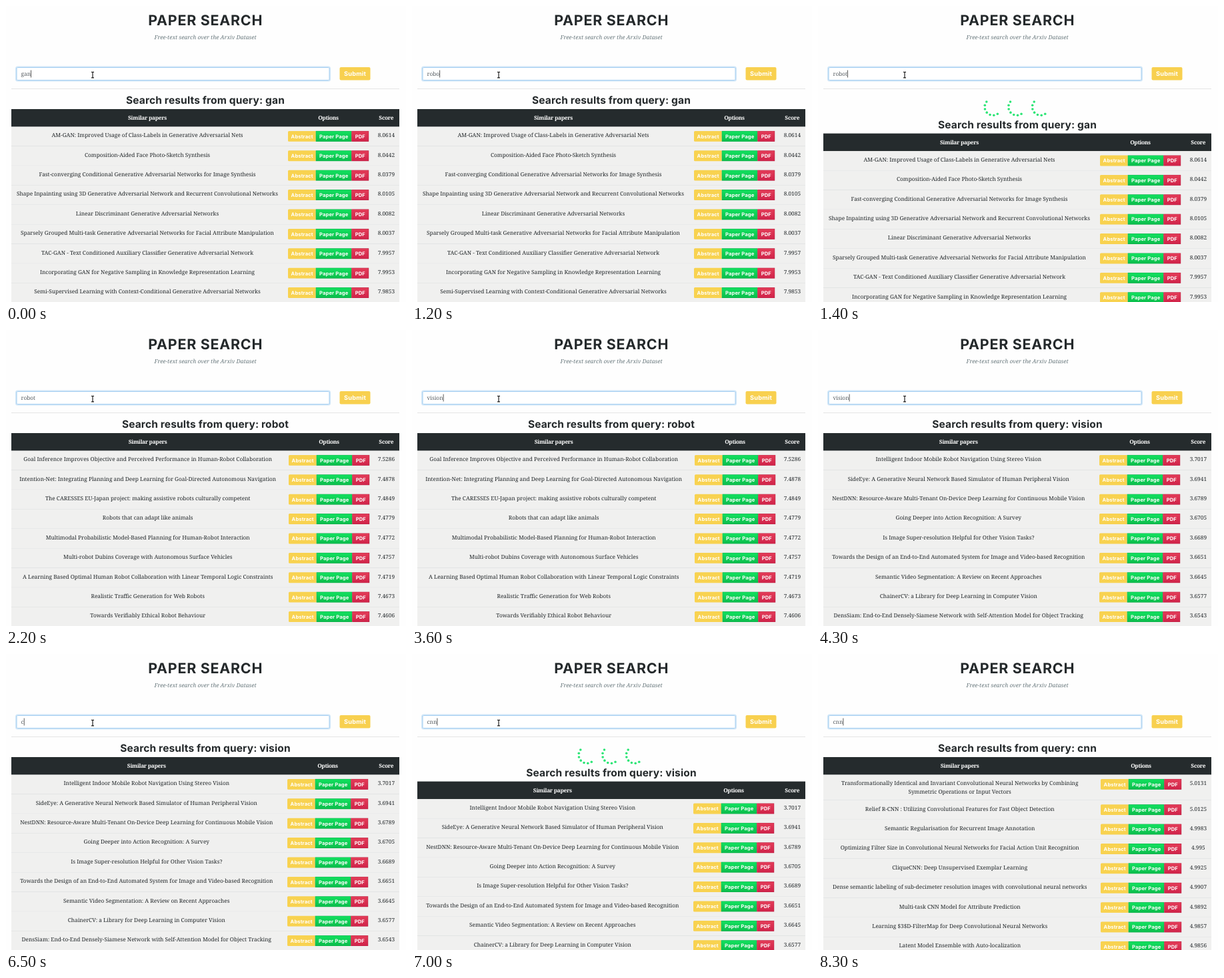
An HTML page for the animation above (9 s loop, 600 by 445 pixels).

```html
<!DOCTYPE html>
<html lang="en">
<head>
<meta charset="utf-8">
<title>Paper Search</title>
<style>
  html, body { margin: 0; width: 100%; height: 100%; overflow: hidden; background: #fefefe; }
  svg { display: block; }
  text { font: 500 8.3px "Noto Serif", serif; fill: #212629; text-rendering: geometricPrecision; white-space: pre; }
  .mid { text-anchor: middle; }
  .title, .heading, .button, .submit { font-family: Inter, sans-serif; font-weight: 700; fill: #24292b; }
  .title { font-size: 21.4px; letter-spacing: .75px; }
  .heading { font-size: 15.5px; letter-spacing: .13px; }
  .subtitle { font-size: 8.45px; font-weight: 400; font-style: italic; fill: #65757a; }
  .button { font-size: 7.6px; letter-spacing: .13px; fill: #fff; }
  .submit { font-size: 9.2px; letter-spacing: .2px; fill: #fff; }
  .column { font-weight: 700; letter-spacing: -.3px; fill: #fff; }
  #query { fill: #555c61; }
</style>
</head>
<body>
<svg width="600" height="445" viewBox="0 0 600 445">
  <defs>
    <linearGradient id="green" x2="0" y2="1"><stop stop-color="#12e05f"/><stop offset="1" stop-color="#0cbd4c"/></linearGradient>
    <linearGradient id="red" x2="0" y2="1"><stop stop-color="#e33c58"/><stop offset="1" stop-color="#d0244a"/></linearGradient>
  </defs>
  <rect width="600" height="445" fill="#fefefe"/>
  <text class="title mid" x="299.2" y="29.3">PAPER SEARCH</text>
  <text class="subtitle mid" x="299" y="50.3">Free-text search over the Arxiv Dataset</text>

  <rect x="15" y="91.5" width="471" height="21" rx="2.5" fill="#fff" stroke="#d2e7f8" stroke-width="2"/>
  <rect x="16" y="92.5" width="469" height="19" rx="1.5" fill="#fff" stroke="#a3cdf0"/>
  <rect id="selection" x="22.5" y="96" height="12" fill="#3297fd"/>
  <text id="query" x="22.5" y="105.3"></text>
  <rect id="caret" y="96.5" width=".8" height="11" fill="#333"/>
  <path id="pointer" d="M-2-4.2H-.6L0-3.7 .6-4.2H2M0-3.7V3.7M-2 4.2H-.6L0 3.7 .6 4.2H2" fill="none" stroke="#222" stroke-width="1.2"/>

  <rect x="500.5" y="92" width="46" height="19.5" rx="2" fill="#f8d04f"/>
  <text class="submit mid" x="523.5" y="104.8">Submit</text>
  <path d="M8 124.5H590" stroke="#e4e4e4"/>
  <g id="loader" fill="#2be575"></g>
  <g id="results"></g>
</svg>
<script>
const LOOP = 9000, ROW = 29.4, LINE = 12.6, BUTTON = 15.9, LOADER_HEIGHT = 36.6;

// shift: offset of the options column; title: centre of the papers column
const searches = {
  gan: { shift: 0, title: 212, papers: [
    ["AM-GAN: Improved Usage of Class-Labels in Generative Adversarial Nets", "8.0614"],
    ["Composition-Aided Face Photo-Sketch Synthesis", "8.0442"],
    ["Fast-converging Conditional Generative Adversarial Networks for Image Synthesis", "8.0379"],
    ["Shape Inpainting using 3D Generative Adversarial Network and Recurrent Convolutional Networks", "8.0105"],
    ["Linear Discriminant Generative Adversarial Networks", "8.0082"],
    ["Sparsely Grouped Multi-task Generative Adversarial Networks for Facial Attribute Manipulation", "8.0037"],
    ["TAC-GAN - Text Conditioned Auxiliary Classifier Generative Adversarial Network", "7.9957"],
    ["Incorporating GAN for Negative Sampling in Knowledge Representation Learning", "7.9953"],
    ["Semi-Supervised Learning with Context-Conditional Generative Adversarial Networks", "7.9853"]] },
  robot: { shift: 1, title: 212.7, papers: [
    ["Goal Inference Improves Objective and Perceived Performance in Human-Robot Collaboration", "7.5286"],
    ["Intention-Net: Integrating Planning and Deep Learning for Goal-Directed Autonomous Navigation", "7.4878"],
    ["The CARESSES EU-Japan project: making assistive robots culturally competent", "7.4849"],
    ["Robots that can adapt like animals", "7.4779"],
    ["Multimodal Probabilistic Model-Based Planning for Human-Robot Interaction", "7.4772"],
    ["Multi-robot Dubins Coverage with Autonomous Surface Vehicles", "7.4757"],
    ["A Learning Based Optimal Human Robot Collaboration with Linear Temporal Logic Constraints", "7.4719"],
    ["Realistic Traffic Generation for Web Robots", "7.4673"],
    ["Towards Verifiably Ethical Robot Behaviour", "7.4606"]] },
  vision: { shift: -1, title: 210.8, papers: [
    ["Intelligent Indoor Mobile Robot Navigation Using Stereo Vision", "3.7017"],
    ["SideEye: A Generative Neural Network Based Simulator of Human Peripheral Vision", "3.6941"],
    ["NestDNN: Resource-Aware Multi-Tenant On-Device Deep Learning for Continuous Mobile Vision", "3.6789"],
    ["Going Deeper into Action Recognition: A Survey", "3.6705"],
    ["Is Image Super-resolution Helpful for Other Vision Tasks?", "3.6689"],
    ["Towards the Design of an End-to-End Automated System for Image and Video-based Recognition", "3.6651"],
    ["Semantic Video Segmentation: A Review on Recent Approaches", "3.6645"],
    ["ChainerCV: a Library for Deep Learning in Computer Vision", "3.6577"],
    ["DensSiam: End-to-End Densely-Siamese Network with Self-Attention Model for Object Tracking", "3.6543"]] },
  cnn: { shift: 1, title: 212.7, papers: [
    ["Transformationally Identical and Invariant Convolutional Neural Networks by Combining|Symmetric Operations or Input Vectors", "5.0131"],
    ["Relief R-CNN : Utilizing Convolutional Features for Fast Object Detection", "5.0125"],
    ["Semantic Regularisation for Recurrent Image Annotation", "4.9983"],
    ["Optimizing Filter Size in Convolutional Neural Networks for Facial Action Unit Recognition", "4.995"],
    ["CliqueCNN: Deep Unsupervised Exemplar Learning", "4.9925"],
    ["Dense semantic labeling of sub-decimeter resolution images with convolutional neural networks", "4.9907"],
    ["Multi-task CNN Model for Attribute Prediction", "4.9892"],
    ["Learning $3$D-FilterMap for Deep Convolutional Neural Networks", "4.9857"],
    ["Latent Model Ensemble with Auto-localization", "4.9856"]] }
};

// Each entry changes part of the state from its time on.
const timeline = [
  [0, { text: "gan", caret: 1, selected: 0, results: "gan", loading: 0, pointer: [130, 103.6] }],
  [200, { selected: .5, caret: 0 }],
  [300, { selected: 1 }],
  [700, { text: "r", selected: 0, caret: 1 }],
  [1100, { text: "rob" }],
  [1200, { text: "robo" }],
  [1400, { text: "robot", loading: 1 }],
  [1500, { loading: 2 }],
  [1600, { results: "robot", loading: 0 }],
  [2200, { caret: 0 }],
  [2400, { selected: .5 }],
  [2500, { selected: 1 }],
  [3100, { text: "v", selected: 0, caret: 1 }],
  [3200, { text: "vi" }],
  [3300, { text: "visi" }],
  [3600, { text: "vision" }],
  [4100, { loading: 1 }],
  [4200, { loading: 2 }],
  [4300, { results: "vision", loading: 0 }],
  [4400, { caret: 0 }],
  [5200, { caret: 1 }],
  [6500, { text: "c" }],
  [6800, { text: "cn" }],
  [6900, { text: "cnn" }],
  [7000, { loading: 1 }],
  [7100, { loading: 2 }],
  [7200, { results: "cnn", loading: 0 }],
  [7600, { caret: 0 }],
  [7800, { pointer: [150, 105.5] }],
  [7900, { pointer: [180, 108] }],
  [8000, { pointer: null }],
  [8300, { caret: 1 }]
];

const $ = id => document.getElementById(id);
const label = (x, y, text, kind = "") => `<text class="mid ${kind}" x="${x}" y="${y}">${text}</text>`;
const box = (x, y, w, h, fill) => `<rect x="${x}" y="${y}" width="${w}" height="${h}" fill="${fill}"/>`;

function buttons(x, y) {
  const bordered = (left, width, border, fill) =>
    box(left, y, width, BUTTON, border) + box(left + .5, y + .5, width - 1, BUTTON - 1, fill);
  return `<path d="M${x + 41.7} ${y}h-40.2q-1.5 0-1.5 1.5v${BUTTON - 3}q0 1.5 1.5 1.5h40.2z" fill="#f8d250"/>` +
    bordered(x + 41.7, 53.6, "#0aa846", "url(#green)") +
    bordered(x + 95.3, 25.9, "#b82243", "url(#red)") +
    label(x + 21.2, y + 10.8, "Abstract", "button") +
    label(x + 68.7, y + 10.8, "Paper Page", "button") +
    label(x + 108.3, y + 10.8, "PDF", "button");
}

function resultsMarkup(name) {
  const { shift, title, papers } = searches[name];
  let svg = label(299, 147.2, "Search results from query: " + name, "heading") +
    box(8, 155, 582, 26.6, "#252b2d") +
    label(title, 171, "Similar papers", "column") +
    label(483.5 + shift, 171, "Options", "column") +
    label(570.3, 171, "Score", "column");
  let y = 181.6;
  for (const [paper, score] of papers) {
    const lines = paper.split("|");
    const height = lines.length > 1 ? 2 * LINE + 13.1 : ROW;
    svg += box(8, y, 582, height, "#f0f0ef") + box(8, y + height - .6, 582, .6, "#d9dcde") +
      lines.map((line, i) => label(title, y + 15.6 + i * LINE, line)).join("") +
      buttons(423 + shift, y + 6.3) + label(570.4, y + 15.6, score);
    y += height;
  }
  return svg;
}

function loaderMarkup(step) {
  let svg = "";
  for (let ring = 0; ring < 3; ring++)
    for (let dot = 0; dot < 7; dot++) {
      const angle = (219 - dot * 27 + (step - 1) * 40) * Math.PI / 180;
      const x = 262.5 + ring * 35.7 + 12.5 * Math.cos(angle);
      const y = 151.8 + 12.5 * Math.sin(angle);
      svg += `<circle cx="${x}" cy="${y}" r="1.8"/>`;
    }
  return svg;
}

let shownResults, shownEntry;
function render(time) {
  const past = timeline.filter(([start]) => start <= time);
  if (past.length === shownEntry) return;
  shownEntry = past.length;
  const state = Object.assign({}, ...past.map(([, change]) => change));

  const query = $("query");
  query.textContent = state.text;
  query.style.fill = state.selected === 1 ? "#fff" : "";
  const width = query.getComputedTextLength();
  $("selection").setAttribute("width", width);
  $("selection").setAttribute("opacity", state.selected);
  $("caret").setAttribute("x", 22.7 + width);
  $("caret").setAttribute("opacity", state.caret);
  $("pointer").setAttribute("opacity", state.pointer ? 1 : 0);
  if (state.pointer) $("pointer").setAttribute("transform", `translate(${state.pointer})`);

  if (state.results !== shownResults) {
    shownResults = state.results;
    $("results").innerHTML = resultsMarkup(shownResults);
  }
  $("loader").innerHTML = state.loading ? loaderMarkup(state.loading) : "";
  $("results").setAttribute("transform", `translate(0 ${state.loading ? LOADER_HEIGHT : 0})`);
}

function tick() {
  render(performance.now() % LOOP);
  requestAnimationFrame(tick);
}
tick();
</script>
</body>
</html>
```
